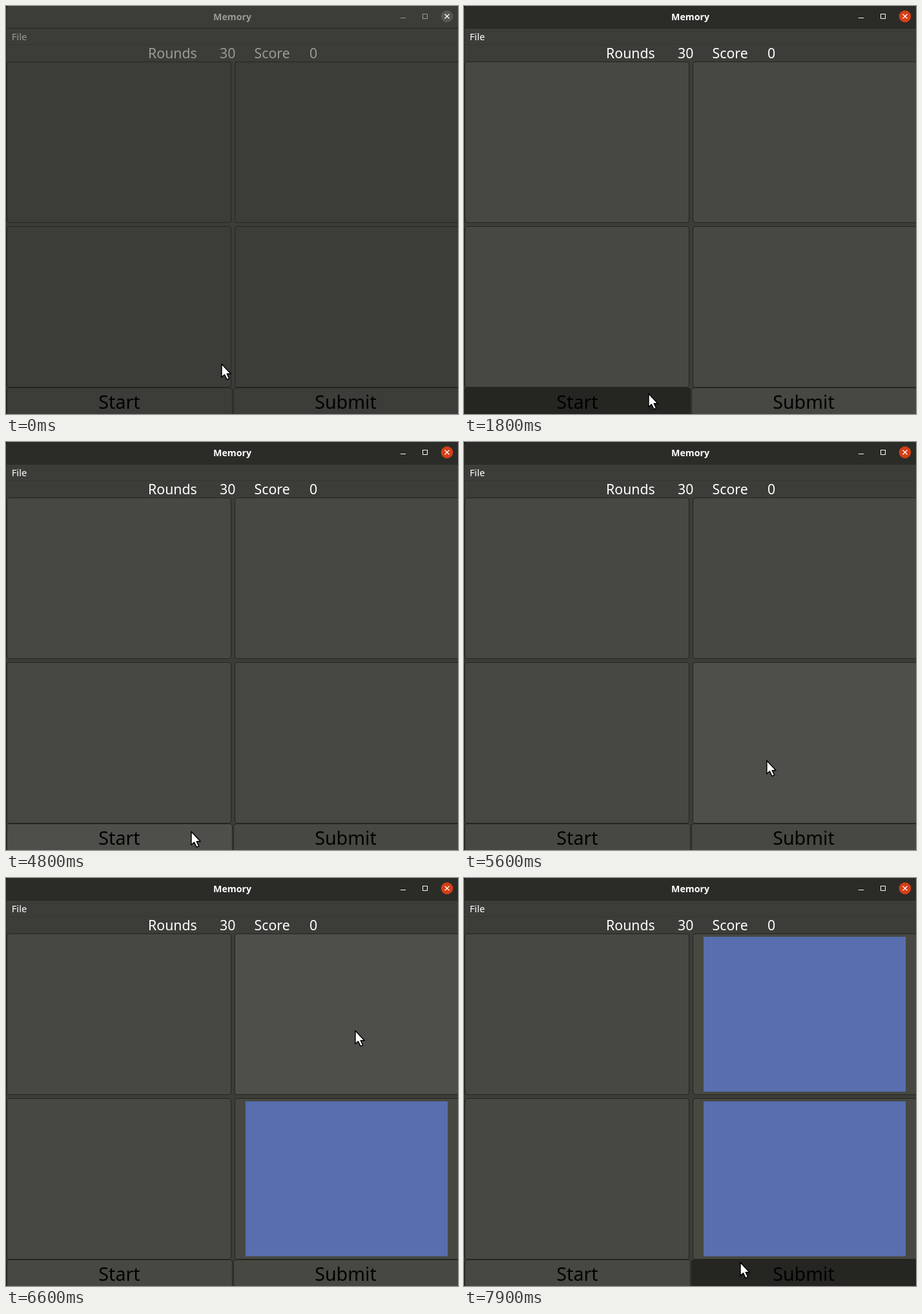
An HTML page for the animation above (8000 ms loop, 700 by 632 pixels).

```html
<!DOCTYPE html>
<html lang="en">
<head>
<meta charset="utf-8">
<title>Memory</title>
<style>
  html, body { margin: 0; width: 100%; height: 100%; overflow: hidden; background: #3c3d38; }
  svg { display: block; width: 100%; height: 100%; font-family: "Noto Sans", "Open Sans", sans-serif; }
  .label { font-size: 21.3px; }
  .action { font-size: 28.7px; text-anchor: middle; }
</style>
</head>
<body>
<svg viewBox="0 0 700 632">
  <rect width="700" height="632" fill="#3c3d38"/>
  <rect id="bar" width="700" height="34"/>
  <path d="M0 34.5H700" stroke="#242520"/>
  <path d="M0 59.5H700" stroke="#353631"/>
  <g id="buttons"></g>
  <path d="M.5 0V632" stroke="#282924"/>
  <path d="M0 0H3L0 3Z" fill="#111"/>

  <g id="texts">
    <text x="350.5" y="22" font-size="14.2" font-weight="700" text-anchor="middle">Memory</text>
    <text x="8.7" y="53" font-size="14.8">File</text>
    <g class="label">
      <text x="220" y="81">Rounds</text>
      <text x="331" y="81">30</text>
      <text x="384.5" y="81">Score</text>
      <text x="470" y="81">0</text>
    </g>
  </g>
  <g id="controls" fill="none">
    <path d="M611 18.5H619"/>
    <rect x="645.5" y="12.5" width="7" height="7"/>
  </g>
  <circle id="close" cx="683" cy="16" r="9.3"/>
  <path d="M679.5 12.5L686.5 19.5M686.5 12.5L679.5 19.5" stroke="#fff" stroke-width="1.3"/>
  <g class="action">
    <text x="175.5" y="624">Start</text>
    <text x="526" y="624">Submit</text>
  </g>
  <path id="cursor" d="M.9 1.4V22L5.4 18L9.1 25.6L12.7 24L9.2 16.7H15.2Z"
        fill="#fff" stroke="#000" stroke-width="1.5" stroke-linejoin="round"/>
</svg>
<script>
const LOOP = 8000, STEP = 100, FADE = 100;
const $ = id => document.getElementById(id);

const INACTIVE = [60, 61, 56], NORMAL = [71, 72, 66], HOVER = [78, 79, 74], PRESSED = [37, 38, 33];
const BAR = [43, 44, 39], CLOSE_OFF = [86, 87, 82], CLOSE_ON = [213, 62, 22];

const moves = [
  { from: 1000, to: 1300, x: 297, y: 584 },
  { from: 1400, to: 1600, x: 285, y: 599 },
  { from: 2100, to: 2200, x: 286, y: 602 },
  { from: 5300, to: 5700, x: 502, y: 472 },
  { from: 6000, to: 6600, x: 540, y: 235 },
  { from: 6900, to: 7700, x: 427, y: 594 }
];
const clicks = {
  start: { down: 1600, up: 1840 },
  lower: { down: 5600, up: 5800 },
  upper: { down: 6600, up: 6760 },
  submit: { down: 7800, up: Infinity }
};
const HIDE = 4800;

const ramp = (t, from, span = FADE) => Math.min(1, Math.max(0, (t - from) / span));
const smooth = k => k * k * (3 - 2 * k);
const mix = (a, b, k) => a.map((v, i) => v + (b[i] - v) * k);
const rgb = c => `rgb(${c.map(Math.round)})`;

function addRect(attrs) {
  const el = document.createElementNS("http://www.w3.org/2000/svg", "rect");
  for (const name in attrs) el.setAttribute(name, attrs[name]);
  return $("buttons").appendChild(el);
}

function addButton(x, y, w, h, click) {
  const face = addRect({ x: x + .5, y: y + .5, width: w - 1, height: h - 1, rx: 3.5, stroke: "#242520" });
  return { x, y, w, h, click, face };
}

const buttons = [];
for (const [row, click] of [clicks.upper, clicks.lower].entries()) {
  const y = 86 + 255 * row;
  buttons.push(addButton(1, y, 348, 250));
  const card = addButton(354, y, 348, 250, click);
  card.tile = addRect({ x: 371, y: y + 5, width: 313, height: 240, fill: "#586eae" });
  buttons.push(card);
}
buttons.push(addButton(1, 591, 350, 46, clicks.start), addButton(352, 591, 350, 46, clicks.submit));

function pointer(t) {
  let pos = [333, 553];
  for (const m of moves) pos = mix(pos, [m.x, m.y], smooth(ramp(t, m.from, m.to - m.from)));
  return pos.map(Math.round);
}

function draw(t) {
  const [x, y] = pointer(t);
  const active = ramp(t, 1500, 300);
  const ink = rgb(mix([154, 154, 151], [255, 255, 255], active));

  $("bar").setAttribute("fill", rgb(mix(INACTIVE, BAR, active)));
  $("texts").setAttribute("fill", ink);
  $("controls").setAttribute("stroke", ink);
  $("close").setAttribute("fill", rgb(mix(CLOSE_OFF, CLOSE_ON, active)));
  $("cursor").setAttribute("transform", `translate(${x} ${y})`);

  const revealed = t >= clicks.start.up && t < HIDE;
  for (const { x: left, y: top, w, h, click, face, tile } of buttons) {
    const over = x >= left && x < left + w && y >= top && y < top + h;
    const base = mix(INACTIVE, over ? HOVER : NORMAL, active);
    const press = click ? ramp(t, click.down) * (1 - ramp(t, click.up)) : 0;
    face.setAttribute("fill", rgb(mix(base, PRESSED, press)));
    if (tile) tile.setAttribute("visibility", revealed || t >= click.up ? "visible" : "hidden");
  }
}

const origin = performance.now();
function tick() {
  const t = (performance.now() - origin) % LOOP;
  draw(Math.floor(t / STEP) * STEP);
  requestAnimationFrame(tick);
}
tick();
</script>
</body>
</html>
```
